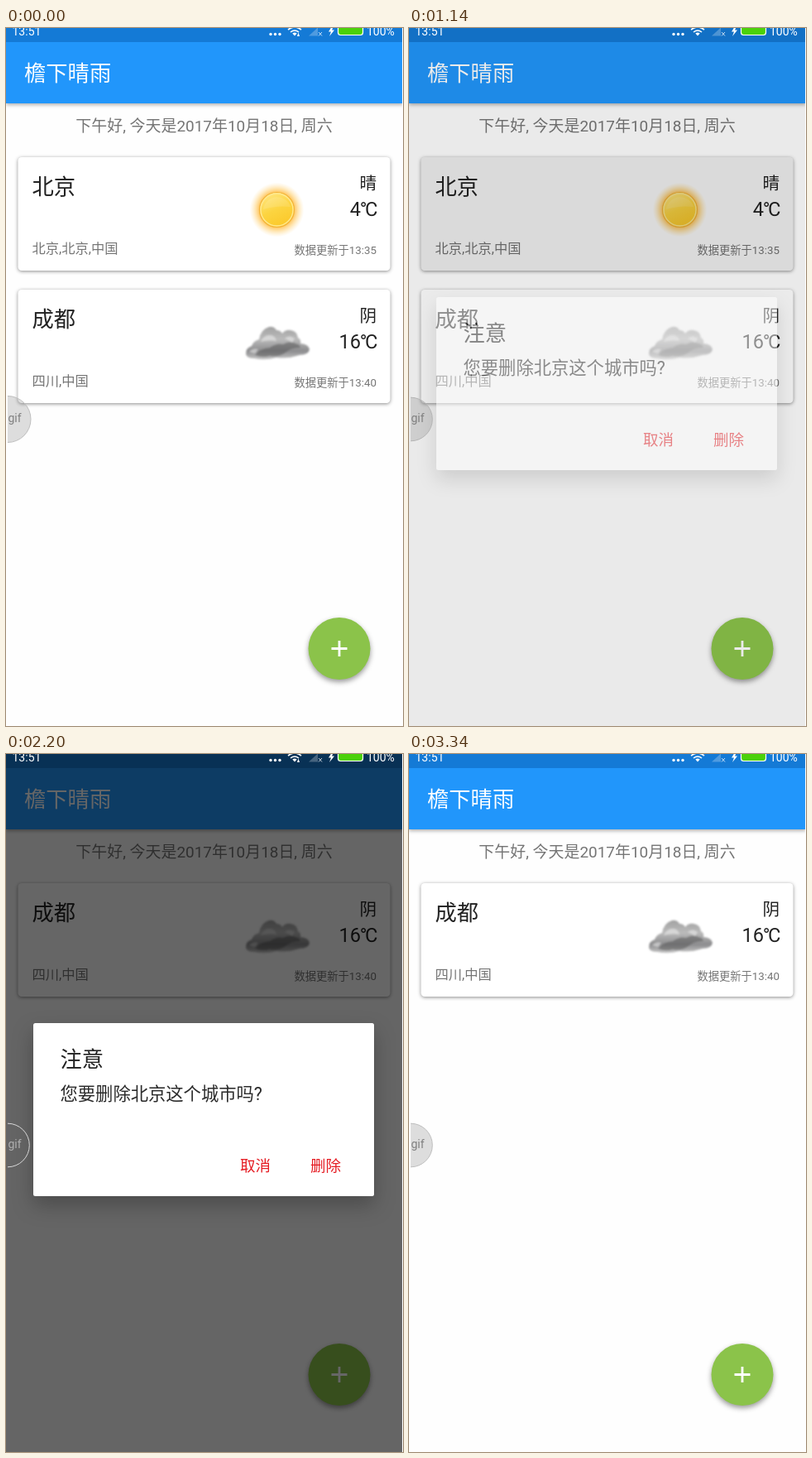
An HTML page that plays this animation: 480 by 843 pixels, repeating every 3700 ms.

```html
<!DOCTYPE html>
<html lang="zh-CN">
<head>
<meta charset="utf-8">
<title>檐下晴雨</title>
<style>
  html, body { margin: 0; width: 100%; height: 100%; overflow: hidden; background: #fefefe; }
  svg { display: block; width: 100%; height: 100%; }
  text { font-family: Roboto, "Noto Sans CJK SC", "Noto Sans CJK", sans-serif; white-space: pre; }
  .title { font-size: 26.3px; fill: #212121; }
  .sky { font-size: 20.6px; fill: #212121; }
  .temp { font-size: 23.5px; fill: #212121; }
  .place { font-size: 16.3px; fill: #757575; }
  .fresh { font-size: 13.3px; fill: #757575; }
  .end { text-anchor: end; }
  .mid { text-anchor: middle; }
  .panel { fill: #fff; filter: drop-shadow(0 1.5px 2.2px rgba(0,0,0,.45)); }
  .button { font-size: 18.5px; fill: #e51c23; }
  .status { font-size: 14px; fill: #fff; }
</style>
</head>
<body>
<svg viewBox="0 0 480 843" preserveAspectRatio="none">
  <defs>
    <radialGradient id="glow">
      <stop offset=".6" stop-color="#ffab19" stop-opacity=".8"/>
      <stop offset=".78" stop-color="#ffc44d" stop-opacity=".45"/>
      <stop offset="1" stop-color="#ffd98a" stop-opacity="0"/>
    </radialGradient>
    <linearGradient id="disc" x1=".25" y1="0" x2=".7" y2="1">
      <stop offset="0" stop-color="#ffe680"/>
      <stop offset=".5" stop-color="#fcd440"/>
      <stop offset="1" stop-color="#fbc829"/>
    </linearGradient>
    <linearGradient id="puff" x1="0" y1="200" x2="0" y2="240" gradientUnits="userSpaceOnUse">
      <stop offset="0" stop-color="#a0a0a0"/>
      <stop offset=".4" stop-color="#bbb"/>
      <stop offset=".75" stop-color="#8c8c8e"/>
      <stop offset="1" stop-color="#c4c4c4"/>
    </linearGradient>
    <linearGradient id="ball" x1="0" y1="0" x2="0" y2="1">
      <stop offset="0" stop-color="#f4f4f4"/>
      <stop offset=".45" stop-color="#bdbdbd"/>
      <stop offset="1" stop-color="#777"/>
    </linearGradient>
    <filter id="soft"><feGaussianBlur stdDeviation=".9"/></filter>
    <clipPath id="edge"><rect x="2" y="430" width="60" height="90"/></clipPath>
  </defs>

  <rect width="480" height="843" fill="#fefefe"/>
  <rect width="480" height="91" fill="#2196fb" style="filter:drop-shadow(0 2px 2px rgba(0,0,0,.3))"/>
  <rect width="480" height="17" fill="#147ad6"/>
  <text x="22" y="64" class="title" style="fill:#fff">檐下晴雨</text>
  <text x="239.5" y="125" class="mid" font-size="18.95" fill="#757575">下午好, 今天是2017年10月18日, 周六</text>
  <g id="cards"></g>
  <circle cx="403" cy="749.5" r="37.5" fill="#8bc34a" style="filter:drop-shadow(0 3px 3px rgba(0,0,0,.4))"/>
  <path d="M393.5 749.5h19M403 740v19" stroke="#fff" stroke-width="2.8"/>

  <rect id="dim" width="480" height="843"/>

  <g id="dialog">
    <rect x="33" y="325" width="412" height="209" rx="2.5" fill="#fff" style="filter:drop-shadow(0 11px 12px rgba(0,0,0,.25))"/>
    <text x="65.5" y="378" class="title">注意</text>
    <text x="65.5" y="418" font-size="21.3" fill="#2b2b2b">您要删除北京这个城市吗?</text>
    <text x="283" y="504" class="button">取消</text>
    <text x="368" y="504" class="button">删除</text>
  </g>

  <g fill="#fff">
    <text x="7.5" y="9" class="status">13:51</text>
    <circle cx="320" cy="7.5" r="1.7"/><circle cx="325.5" cy="7.5" r="1.7"/><circle cx="331" cy="7.5" r="1.7"/>
    <path d="M341 2q8-6 16 0M344 5q5-4 10 0" fill="none" stroke="#fff" stroke-width="1.6"/>
    <path d="M346.3 6.5q2.7-2 5.4 0l-2.7 3z"/>
    <path id="traffic" d="M352 10l1.5-4.5 1.5 4.500z"/>
    <path d="M366 9.5l11-10v10z" opacity=".25"/>
    <path d="M378 5l4 4.500m0-4.500l-4 4.500" stroke="#fff" opacity=".75"/>
    <path d="M394-2l-4 6.500h3l-2 5.500 6-7.500h-3l2-4.500z"/>
    <rect x="401.500" y="-4" width="30" height="12.500" rx="3" fill="#4bd10a" stroke="#fff" stroke-width="1.200"/>
    <text x="436" y="9" class="status">100%</text>
  </g>

  <g clip-path="url(#edge)">
    <circle id="knob" cx="2" cy="472.5" fill="rgba(100,100,100,.21)" stroke-width="1"/>
    <text id="tag" x="2.5" y="476" font-size="14">gif</text>
  </g>
  <rect x="479" width="1" height="843" fill="#fff"/>
</svg>
<script>
const $ = id => document.getElementById(id);

const sun = `<circle cx="327.5" cy="219.5" r="33" fill="url(#glow)"/>
  <circle cx="327.5" cy="219.5" r="21" fill="url(#disc)" stroke="#f3b33a" stroke-width="1.2"/>
  <circle cx="327.5" cy="219.5" r="19.5" fill="none" stroke="#ffe88f" stroke-width="1.4"/>
  <path d="M311 219a17 17 0 0 1 33-3q-17-2-33 3z" fill="#fff" opacity=".12"/>`;

const cloud = `<g filter="url(#soft)">
  <path d="M290 234q0-8 7-10 2-6 9-8 2-12 12-15 6-1 9 4 5 0 7 4 4-5 10-4 8 1 9 9 4 2 3 7 10 1 11 7-1 7-12 7-14 5-28 3-14 4-27 1-9 0-10-5z" fill="url(#puff)"/>
  <path d="M301 235q6-8 18-9 8-6 16-4 8-5 15-1 5 1 6 5-12 0-18 6-8 6-19 4-9 3-18-1z" fill="#555" opacity=".5"/>
  <path d="M308 219q4-9 12-8 6 1 7 7-9-2-19 1zM337 215q6-5 12 0l-3 5q-4-3-9-5zM294 231q5-5 11-3l-4 5z" fill="#eee" opacity=".55"/>
</g>`;

const ball = `<circle cx="327.5" cy="219" r="24" fill="url(#ball)" filter="url(#soft)"/>
  <text x="327.5" y="228" class="mid" font-size="21">N/A</text>`;

const reading = (icon, sky, temp, time) => `${icon}
  <text x="448" y="195" class="sky end">${sky}</text>
  <text x="449.5" y="227" class="temp end">${temp}℃</text>
  <text x="448" y="273" class="fresh end">数据更新于${time}</text>`;

const card = (id, city, place, body) => `<g id="${id}">
  <rect x="14.5" y="156" width="450" height="137" rx="4.5" class="panel"/>
  <text x="31.5" y="201" class="title">${city}</text>
  <text x="31.5" y="272" class="place">${place}</text>
  ${body}</g>`;

$("cards").innerHTML =
  card("first", "北京", "北京,北京,中国", reading(sun, "晴", "4", "13:35") +
    `<rect id="press" x="14.5" y="156" width="450" height="137" rx="4.5"/>`) +
  card("second", "成都", "四川,中国",
    `<g id="known">${reading(cloud, "阴", "16", "13:40")}</g>
     <g id="blank">${reading(ball, "- - - -", "--", '<tspan letter-spacing="2.4">--:--</tspan>')}</g>`);

const LOOP = 3700;
// The screen only refreshes at these times.
const ticks = [0, 150, 270, 750, 840, 940, 1040, 1140, 1240, 1340,
  1430, 1530, 1630, 1730, 2200, 2300, 2390, 2480, 3340];

// Linear track through [time, value] points.
function track(t, points) {
  let [t0, v0] = points[0];
  for (const [t1, v1] of points) {
    if (t < t1) return t1 > t0 ? v0 + (v1 - v0) * (t - t0) / (t1 - t0) : v0;
    [t0, v0] = [t1, v1];
  }
  return v0;
}

const show = (id, on) => $(id).style.display = on ? "" : "none";

function draw(now) {
  const clock = now % LOOP;
  const t = ticks.filter(x => x <= clock).pop();
  const dim = track(t, [[1040, 0], [1140, .08], [1240, .36], [1340, .6], [2200, .6], [2390, .22], [2480, 0]]);
  const fade = track(t, [[1040, 0], [1140, .5], [1240, 1], [2200, 1], [2300, .45], [2390, .05], [2480, 0]]);
  const press = track(t, [[750, 0], [1040, .07], [1140, .07], [1340, .03], [1730, 0]]);
  const removed = t >= 2200;
  const blank = t >= 2300 && t < 2480;

  $("dim").setAttribute("opacity", dim);
  $("dialog").setAttribute("opacity", fade);
  $("press").setAttribute("opacity", press);
  show("first", !removed);
  $("second").setAttribute("transform", `translate(0 ${removed ? 0 : 160})`);
  show("blank", blank);
  show("known", !blank);
  show("traffic", t < 270 || t >= 1340 && t < 3340);

  $("knob").setAttribute("r", track(t, [[0, 28], [270, 26.3]]));
  const lit = Math.max(0, (dim - .25) / .35);
  const gray = (base, bright) => `rgb(${Array(3).fill(Math.round(base + (bright - base) * lit))})`;
  $("knob").setAttribute("stroke", gray(190 - 130 * Math.min(dim, .25), 215));
  $("tag").setAttribute("fill", gray(128, 175));
}

let start;
function frame(now) {
  start ??= now;
  draw(now - start);
  requestAnimationFrame(frame);
}
requestAnimationFrame(frame);
</script>
</body>
</html>
```
